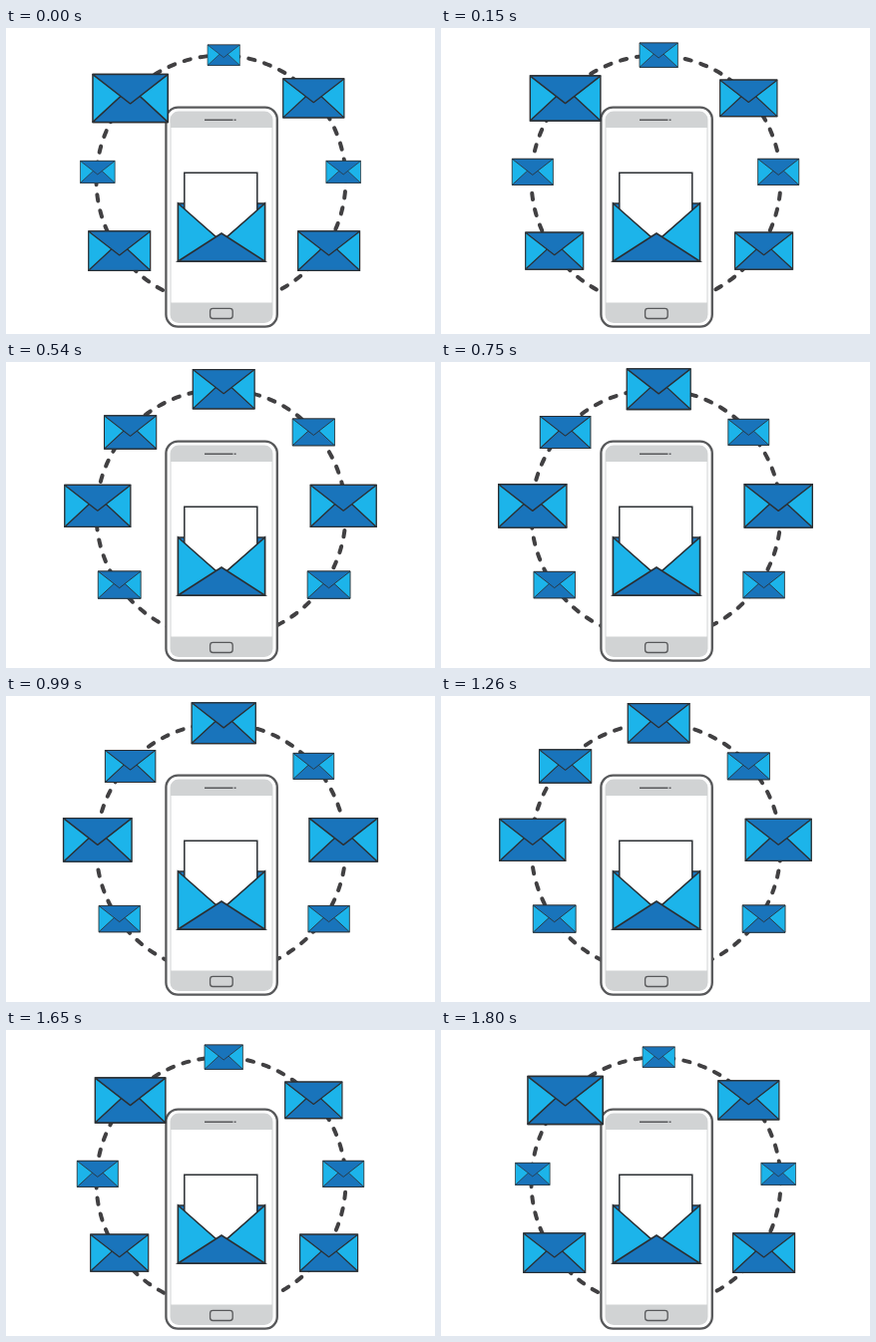
Recreate the animation shown at these times as an HTML page. Size 430x307 px, loop 1.83 s.

```html
<!DOCTYPE html>
<html lang="en">
<head>
<meta charset="utf-8">
<title>Mail on a phone</title>
<style>
  html, body { margin: 0; width: 100%; height: 100%; overflow: hidden; background: #fff; }
  svg { display: block; width: 100vw; height: 100vh; }
</style>
</head>
<body>
<svg viewBox="0 0 430 307">
  <defs>
    <g id="mail" stroke="#2b2f33" stroke-width="1.4">
      <path fill="#1cb4ea" d="M-34.3-21.8H34.3V21.8H-34.3Z"/>
      <path fill="#1974bb" stroke-linejoin="bevel" d="M-34.3 21.8L0-10L34.3 21.8Z"/>
      <path fill="#1974bb" stroke-linejoin="bevel" d="M-34.3-21.8L0 5L34.3-21.8Z"/>
    </g>
  </defs>

  <circle id="ring" r="125" fill="none" stroke="#414042" stroke-width="4"
    stroke-linecap="round" pathLength="360" stroke-dasharray="2.9 4.6"/>

  <g stroke="#58595b">
    <rect x="160.4" y="79.6" width="111.4" height="220" rx="12" fill="#fff" stroke-width="2.3"/>
    <rect x="164.5" y="83.5" width="103" height="212.5" rx="8.5" fill="#d1d3d4" stroke="none"/>
    <path d="M165.5 100H266.5V275.5H165.5Z" fill="#fff" stroke="none"/>
    <path d="M199 92.3H227.5M228.7 92.3H230.5" stroke-width="1.6"/>
    <rect x="204.6" y="281.3" width="22.6" height="10.2" rx="2.8" fill="none" stroke-width="1.3"/>
  </g>

  <g stroke="#2b2f33" stroke-width="1.5">
    <path fill="#1974bb" d="M172.5 176H259.5V234H172.5Z"/>
    <path fill="#fff" d="M178.8 145.3H251.8V184L216 214L178.8 184Z"/>
    <path fill="#1cb4ea" d="M172.5 176L216 214.5L259.5 176V234H172.5Z"/>
    <path fill="#1974bb" d="M172.5 234L216 206L259.5 234Z"/>
  </g>

  <g id="mails"></g>
</svg>
<script>
const LOOP = 1830, STEP = 30, HALF = 900;
const DASH_PITCH = 7.5, RING_START = -2.15;
const ring = document.getElementById('ring');

// centre, width at the start, width at the midpoint
const mails = [
  [218.2, 27.2, 33, 65.6],
  [91.8, 144.4, 35.4, 70],
  [338.2, 144.4, 35.4, 70],
  [124.6, 70.5, 76.8, 51.4],
  [308.3, 70.4, 62.4, 41.6],
  [113.7, 223.6, 63.2, 42.2],
  [323.6, 223.6, 63.2, 42.2]
].map(([x, y, from, to]) => {
  const node = document.createElementNS('http://www.w3.org/2000/svg', 'use');
  node.setAttribute('href', '#mail');
  document.getElementById('mails').append(node);
  return { x, y, from, to, node };
});

// cubic-bezier(1/3, 0, 0, 1)
function ease(x) {
  let low = 0, high = 1;
  for (let i = 0; i < 24; i++) {
    const s = (low + high) / 2;
    if (s * (1 - s) ** 2 + s ** 3 < x) low = s; else high = s;
  }
  return low * low * (3 - 2 * low);
}

function draw(now) {
  const time = Math.floor(now % LOOP / STEP) * STEP;
  const p = ease(1 - Math.abs(HALF - time) / HALF);
  for (const { x, y, from, to, node } of mails) {
    const scale = (from + (to - from) * p) / 70;
    node.setAttribute('transform', `translate(${x} ${y}) scale(${scale})`);
  }
  const angle = RING_START + DASH_PITCH * time / (2 * HALF);
  ring.setAttribute('transform', `translate(215.5 152.5) rotate(${angle})`);
}

const start = performance.now();
function tick() {
  draw(performance.now() - start);
  requestAnimationFrame(tick);
}
draw(0);
requestAnimationFrame(tick);
</script>
</body>
</html>
```
